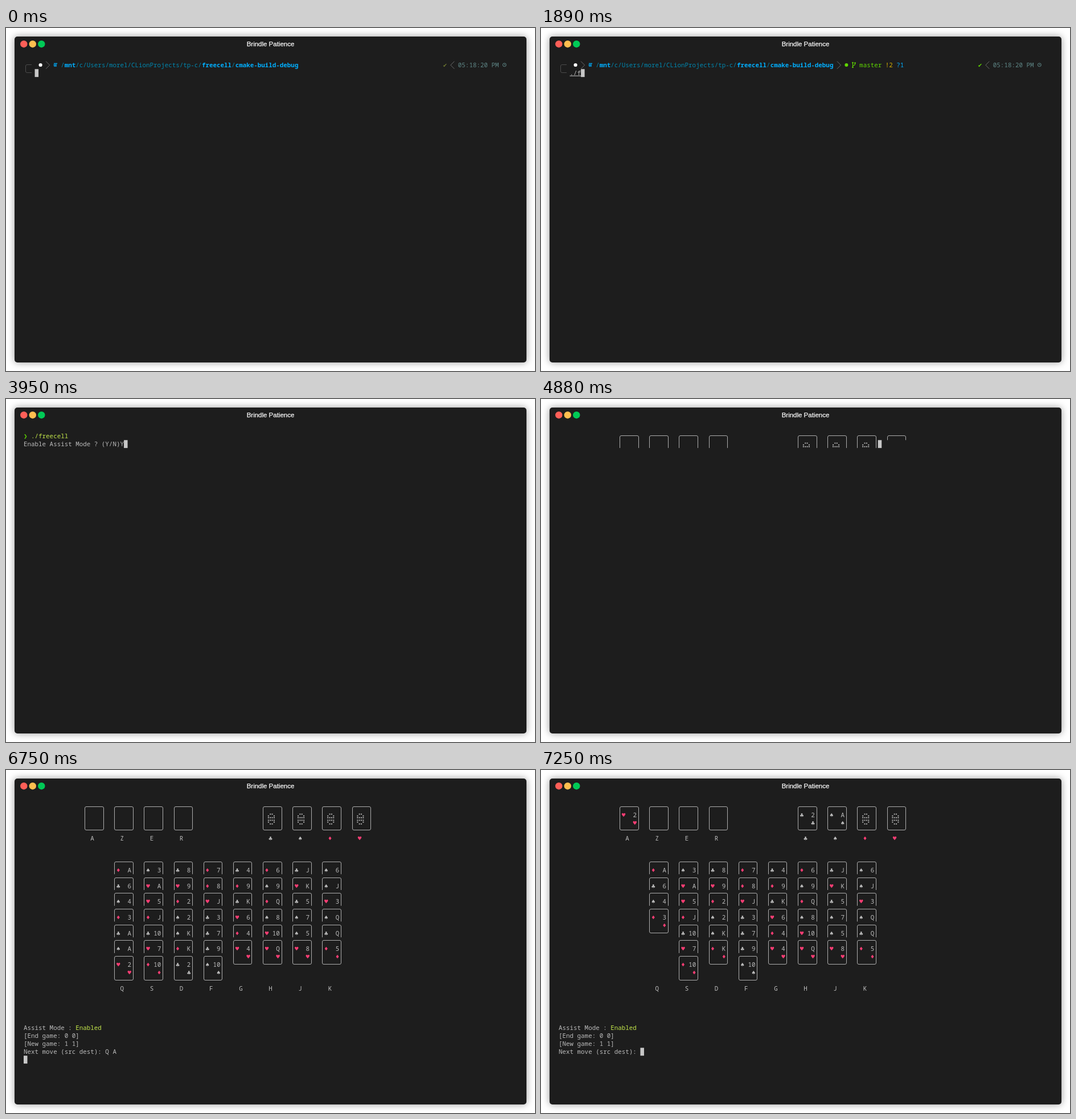
Recreate the animation shown at these times as an HTML page. Size 929 by 603 pixels, loop 8 s.

```html
<!DOCTYPE html>
<html lang="en">
<head>
<meta charset="utf-8">
<title>Brindle Patience</title>
<style>
  html, body { margin: 0; width: 100%; height: 100%; overflow: hidden; background: #fff; }
  #win { position: absolute; left: 15px; top: 15px; width: 899px; height: 573px; border-radius: 5px;
    background: #1d1d1d; box-shadow: 0 0 13px rgba(0, 0, 0, .4); }
  svg { position: absolute; left: 0; top: 0; }
  text { white-space: pre; font: 500 10.867px "Noto Sans Mono", "DejaVu Sans Mono", "DejaVu Sans", monospace;
    font-variant-ligatures: none; }
  .bold { font-weight: 700; }
  .path { text-decoration: underline; }
  .title { font: 11.5px "Liberation Sans", Arial, sans-serif; text-anchor: middle; stroke: #fff; stroke-width: .25px; }
</style>
</head>
<body>
<div id="win"></div>
<svg width="929" height="603" viewBox="0 0 929 603">
  <circle cx="31.3" cy="28.2" r="6.2" fill="#ff5f58"/>
  <circle cx="46.8" cy="28.2" r="6.2" fill="#ffbe4f"/>
  <circle cx="62.3" cy="28.2" r="6.2" fill="#00ca56"/>
  <text class="title" x="464.5" y="32.4" fill="#fff">Brindle Patience</text>
  <g id="screen"></g>
</svg>
<script>
const LOOP = 8000, CW = 6.52, RH = 13.87;
const FG = '#bbb', LINE = '#adadad', BLUE = '#00afff', PATH = '#0087af', GREEN = '#5fd700',
  LIME = '#c3e64a', RED = '#fb3d74', DIM = '#4c4c4c', TEAL = '#5f8787';
const X = col => 31 + col * CW;
const Y = row => 58.4 + row * RH;
const snap = v => Math.floor(v) + .5;

// Terminal primitives, placed by column and row
const text = (col, row, str, fill = FG, attrs = '') =>
  `<text x="${X(col)}" y="${Y(row) + 10.4}" fill="${fill}" ${attrs}>${str}</text>`;
const stroke = (d, color = LINE, width = 1) =>
  `<path d="${d}" fill="none" stroke="${color}" stroke-width="${width}"/>`;
const disc = (x, y, r, fill) => `<circle cx="${x}" cy="${y}" r="${r}" fill="${fill}"/>`;
const cursor = (col, row) =>
  `<rect x="${X(col)}" y="${Y(row)}" width="${CW}" height="${RH}" fill="#c7c7c7"/>`;
const chevron = (col, dir) =>
  stroke(`M${X(col + .5) - 3.3 * dir} 58.6l${6.6 * dir} 6.6l${-6.6 * dir} 6.6`, '#6a6a6a');

// Shell prompt
const BOLD = 'class="bold"';
const PARTS = [['/', PATH], ['mnt', BLUE, BOLD], ['/c/Users/morel/CLionProjects/tp-c/', PATH],
  ['freecell', BLUE, BOLD], ['/', PATH], ['cmake-build-debug', BLUE, BOLD]];

function prompt(typed, git, done) {
  let out = stroke('M45 64.5H37Q34.5 64.5 34.5 67V76Q34.5 78.5 37 78.5H45', DIM)
    + disc(60.6, 65, 3.1, '#fff') + chevron(6, 1)
    + stroke('M84 62.5h6M83.5 65h5.5M84 67.2h5', BLUE, 1.3);
  let col = 10;
  for (const [str, color, attrs] of PARTS) {
    out += text(col, 0, str, color, attrs);
    col += str.length;
  }
  if (git) out += chevron(75, 1) + disc(536.4, 65, 3, GREEN)
    + stroke('M547.5 61.5v7M551.5 62v1.5q0 2-4 2.5', GREEN, 1.1)
    + disc(547.5, 61, 1.3, GREEN) + disc(547.5, 69, 1.3, GREEN) + disc(551.5, 61.5, 1.3, GREEN)
    + text(81, 0, 'master', GREEN) + text(88, 0, '!2', '#d7af00') + text(91, 0, '?1', BLUE);
  out += text(113, 0, '✔', git ? GREEN : '#6c7630') + chevron(115, -1)
    + text(117, 0, '05:18:20 PM', TEAL)
    + `<circle cx="875.4" cy="64.8" r="3" fill="none" stroke="${TEAL}"/>`
    + stroke('M875.4 63v2h1.6', TEAL, .8);
  return out + text(3, 1, typed, done ? LIME : FG, done ? '' : 'class="path"')
    + cursor(3 + typed.length, 1);
}

function launched(answer) {
  return text(0, 0, '❯', GREEN) + text(2, 0, './freecell', LIME)
    + (answer == null ? cursor(0, 1)
      : text(0, 1, 'Enable Assist Mode ? (Y/N)' + answer));
}

// Cards
const SUITS = { C: '♣', S: '♠', D: '♦', H: '♥' };
const DEAL = ['DA C6 S4 D3 CA SA H2', 'S3 HA H5 DJ C10 H7 D10', 'C8 H9 D2 S2 SK DK C2',
  'D7 D8 HJ C3 C7 C9 S10', 'C4 D9 CK H6 D4 H4', 'D6 S9 DQ S8 H10 HQ',
  'CJ HK C5 S7 S5 H8', 'S6 SJ H3 SQ CQ D5'];
const suitColor = s => s === 'D' || s === 'H' ? RED : FG;
const suit = (col, row, s) => text(col, row, SUITS[s], suitColor(s));

// A box of four rows is closed; a shorter one is open below
function box(col, row, rows = 4) {
  const l = snap(X(col + .5)), r = snap(X(col + 5.5)), t = snap(Y(row) + 5.8);
  if (rows === 4)
    return `<rect x="${l}" y="${t}" width="${r - l}" height="${snap(Y(row + 3) + 5.8) - t}" rx="2.5" fill="none" stroke="${LINE}"/>`;
  return stroke(`M${l} ${Y(row + rows)}V${t + 2.5}q0-2.5 2.5-2.5H${r - 2.5}q2.5 0 2.5 2.5V${Y(row + rows)}`);
}

function card(col, row, name, full = true) {
  const s = name[0];
  return box(col, row, full ? 4 : 2) + suit(col + 1, row + 1, s)
    + text(col + 5, row + 1, name.slice(1), FG, 'text-anchor="end"')
    + (full ? suit(col + 4, row + 2, s) : '');
}

function emblem(col, lines = 6) {
  const ys = [77.6, 80.7, 83.8, 88.4, 91.6, 94.8], marks = ['12', '03', '0123', '0123', '03', '12'];
  return ys.slice(0, lines).map((y, i) => [...marks[i]].map(n =>
    `<rect x="${X(col) + 11.6 + n * 3.35}" y="${y - .9}" width="2" height="1.8" fill="${FG}"/>`).join('')).join('');
}

const CELLS = [16, 24, 32, 40], PILES = [64, 72, 80, 88];

function firstRows() {
  return CELLS.map(c => box(c, 0, 2)).join('')
    + PILES.map((c, i) => i < 3 ? box(c, 0, 2) + emblem(c, 3) : box(c, 0, 1)).join('')
    + cursor(86, 1);
}

function board(moves) {
  const cols = DEAL.map(d => d.split(' ')), cells = [], piles = {};
  if (moves > 0) cells[0] = cols[0].pop();
  if (moves > 1) piles.S = cols[0].pop();
  if (moves > 2) piles.C = cols[0].pop();
  if (moves > 3) piles.C = cols[2].pop();
  let out = '';
  CELLS.forEach((c, i) =>
    out += (cells[i] ? card(c, 0, cells[i]) : box(c, 0)) + text(c + 2, 4, 'AZER'[i]));
  PILES.forEach((c, i) => {
    const s = 'CSDH'[i];
    out += (piles[s] ? card(c, 0, piles[s]) : box(c, 0) + emblem(c)) + suit(c + 2, 4, s);
  });
  cols.forEach((list, i) => {
    const c = 24 + 8 * i;
    list.forEach((name, n) => out += card(c, 7 + 2 * n, name, n === list.length - 1));
    out += text(c + 2, 23, 'QSDFGHJK'[i]);
  });
  return out;
}

function turn(moves, typed, entered) {
  return board(moves) + text(0, 28, 'Assist Mode : ') + text(14, 28, 'Enabled', LIME)
    + text(0, 29, '[End game: 0 0]') + text(0, 30, '[New game: 1 1]')
    + text(0, 31, 'Next move (src dest): ' + typed)
    + (entered ? cursor(0, 32) : cursor(22 + typed.length, 31));
}
const drawing = moves => board(moves) + cursor(0, 24);

const SCENES = [
  [0, () => prompt('', false)],
  [870, () => prompt('.', false)],
  [1320, () => prompt('./', false)],
  [1520, () => prompt('./', true)],
  [1890, () => prompt('./f', true)],
  [2000, () => prompt('./fr', true)],
  [2200, () => prompt('./fre', true)],
  [2350, () => prompt('./free', true)],
  [2460, () => prompt('./freecell', true, true)],
  [2850, () => launched()],
  [2950, () => launched('') + cursor(26, 1)],
  [3950, () => launched('Y') + cursor(27, 1)],
  [4780, () => launched('Y') + cursor(0, 2)],
  [4880, firstRows],
  [4980, () => turn(0, '')],
  [5980, () => turn(0, 'Q')],
  [6160, () => turn(0, 'Q ')],
  [6440, () => turn(0, 'Q A')],
  [6750, () => turn(0, 'Q A', true)],
  [6850, () => drawing(1)],
  [7050, () => drawing(2)],
  [7150, () => drawing(3)],
  [7250, () => turn(4, '')]
];

const screen = document.getElementById('screen');
const start = performance.now();
let shown;
function tick() {
  const t = (performance.now() - start) % LOOP;
  const scene = SCENES.findLast(([at]) => at <= t);
  if (scene !== shown) screen.innerHTML = (shown = scene)[1]();
  requestAnimationFrame(tick);
}
tick();
</script>
</body>
</html>
```
